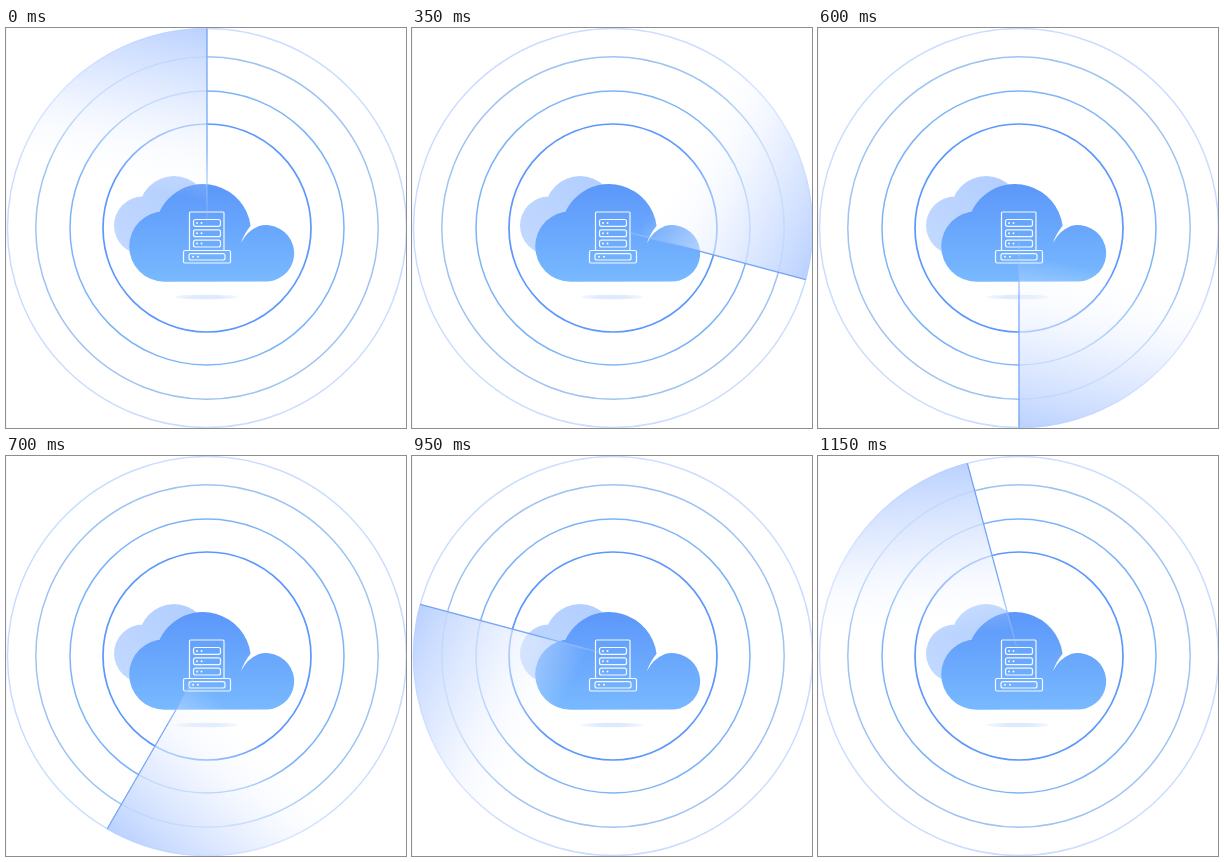
Write an HTML page with a canvas that moves like this. It is 400 by 400 pixels and loops after 1.2 s.

```html
<!DOCTYPE html>
<html lang="en">
<head>
<meta charset="utf-8">
<title>Cloud radar</title>
<style>
  html, body { margin: 0; width: 100%; height: 100%; overflow: hidden; background: #fff; }
  canvas { display: block; width: 100vw; height: 100vh; }
</style>
</head>
<body>
<canvas id="stage" width="400" height="400"></canvas>
<script>
const ctx = document.getElementById('stage').getContext('2d');
const CX = 201, CY = 200, RADIUS = 199.5;
const LOOP = 1200, STEP = 50;
const TAU = Math.PI * 2;

function gradient(x0, y0, x1, y1, stops) {
  const g = ctx.createLinearGradient(x0, y0, x1, y1);
  stops.forEach(([at, color]) => g.addColorStop(at, color));
  return g;
}

function disc(path, x, y, r) {
  path.moveTo(x + r, y);
  path.arc(x, y, r, 0, TAU);
}

function ring(r, color, width) {
  ctx.beginPath();
  ctx.arc(CX, CY, r, 0, TAU);
  ctx.strokeStyle = color;
  ctx.lineWidth = width;
  ctx.stroke();
}

function box(x, y, w, h, r) {
  ctx.beginPath();
  ctx.roundRect(x, y, w, h, r);
  ctx.stroke();
}

const backCloud = new Path2D();
disc(backCloud, 137, 197.5, 29);
disc(backCloud, 168, 183, 35);

const frontCloud = new Path2D();
disc(frontCloud, 158.5, 218.5, 35.3);
frontCloud.moveTo(151, 190);
frontCloud.arc(197, 204, 48, Math.PI * 1.09, -0.13);
frontCloud.quadraticCurveTo(238, 206, 235, 215);
frontCloud.quadraticCurveTo(241, 203, 252, 198.6);
frontCloud.arc(260, 225.3, 28.2, -1.85, Math.PI / 2);
frontCloud.lineTo(158, 253.7);
frontCloud.closePath();

function drawClouds() {
  ctx.fillStyle = gradient(108, 225, 180, 150, [[0, '#c3d9ff'], [1, '#b3cfff']]);
  ctx.fill(backCloud);
  ctx.fillStyle = gradient(0, 156, 0, 254, [[0, '#5c97fa'], [1, '#78b9ff']]);
  ctx.fill(frontCloud);

  ctx.fillStyle = gradient(169, 0, 231, 0,
    [[0, '#f1f7ff'], [0.3, '#deebfd'], [0.7, '#deebfd'], [1, '#f1f7ff']]);
  ctx.beginPath();
  ctx.ellipse(200, 269, 31, 2.3, 0, 0, TAU);
  ctx.fill();
}

function drawServer() {
  ctx.strokeStyle = ctx.fillStyle = '#f4f9ff';
  ctx.lineWidth = 1.2;
  box(183.5, 184, 34.5, 38.5, 1);
  box(177.5, 222.5, 47, 12.5, 1.5);
  box(183, 225.7, 36, 6.3, 2);
  const dots = [[187, 228.8], [192, 228.8]];
  for (const y of [191.5, 201.9, 212.2]) {
    box(187.5, y, 27, 6.8, 2);
    dots.push([191, y + 3.4], [195.5, y + 3.4]);
  }
  for (const [x, y] of dots) {
    ctx.beginPath();
    ctx.arc(x, y, 1, 0, TAU);
    ctx.fill();
  }
}

function drawSweep(angle) {
  const tilt = 0.2, ux = Math.sin(tilt), uy = -Math.cos(tilt);
  ctx.save();
  ctx.translate(CX, CY);
  ctx.rotate(angle);

  ctx.fillStyle = gradient(ux * 25, uy * 25, ux * 197, uy * 197, [
    [0, 'rgba(255,255,255,0)'],
    [0.5, 'rgba(224,234,255,0.72)'],
    [1, 'rgba(183,207,255,0.97)']
  ]);
  ctx.beginPath();
  ctx.moveTo(0, 0);
  ctx.arc(0, 0, RADIUS + 0.5, -Math.PI, -Math.PI / 2);
  ctx.closePath();
  ctx.fill();

  ctx.strokeStyle = gradient(0, 0, 0, -RADIUS, [
    [0, 'rgba(190,215,255,0)'],
    [0.2, 'rgba(150,190,255,0.7)'],
    [0.4, '#76a8f9'],
    [1, '#70a3f5']
  ]);
  ctx.lineWidth = 1.3;
  ctx.beginPath();
  ctx.moveTo(0, 0);
  ctx.lineTo(0, -RADIUS);
  ctx.stroke();
  ctx.restore();
}

function draw(time) {
  const step = Math.floor((time % LOOP) / STEP);
  ctx.fillStyle = '#fff';
  ctx.fillRect(0, 0, 400, 400);
  ctx.fillStyle = '#f3f5ff';
  ctx.fillRect(0, 0, 1, 400);

  ring(RADIUS, '#cbddff', 1.5);
  ring(171.2, '#9dc3f4', 1.5);
  ring(137, '#7db4f8', 1.5);
  ring(104, '#5c98fb', 1.7);
  drawClouds();
  drawServer();
  drawSweep(step * STEP / LOOP * TAU);
}

const start = performance.now();
function tick() {
  draw(performance.now() - start);
  requestAnimationFrame(tick);
}
tick();
</script>
</body>
</html>
```
